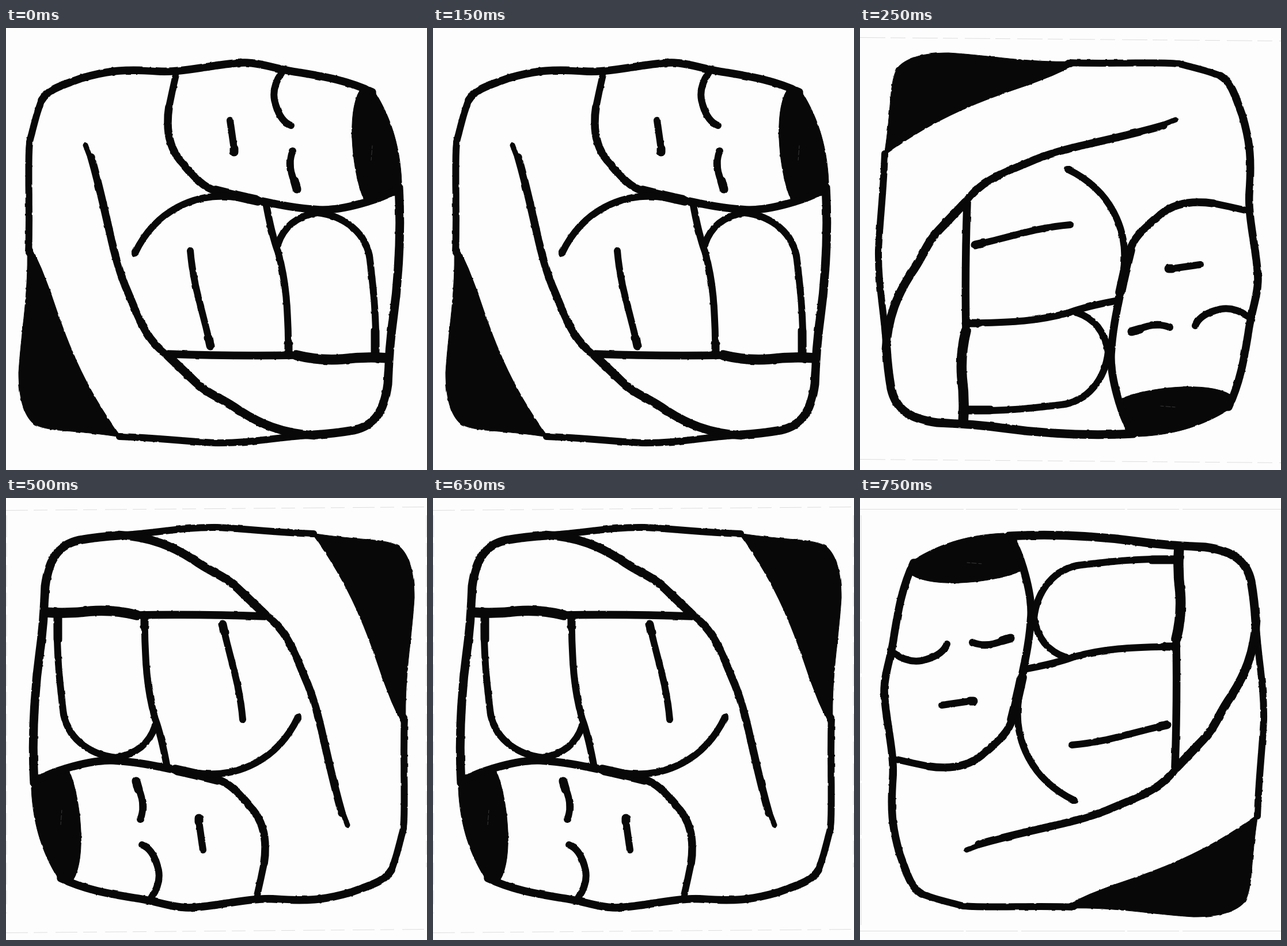
An HTML page that plays this animation: 731 by 766 pixels, repeating every 1000 ms.

```html
<!DOCTYPE html>
<html lang="en">
<head>
<meta charset="utf-8">
<title>Turning portrait</title>
<style>
  html, body { margin: 0; width: 100%; height: 100%; overflow: hidden; background: #fdfdfd; }
  svg { display: block; width: 100%; height: 100%; overflow: hidden; }

  /* Quarter turns, each held for 250 ms */
  .turn { animation: turn 1s step-end infinite; }
  @keyframes turn {
    0% { transform: matrix(0, 1, -1, 0, 748, 18); }
    25% { transform: matrix(-1, 0, 0, -1, 733, 769); }
    50% { transform: matrix(0, -1, 1, 0, -17, 752); }
    75%, 100% { transform: none; }
  }

  .edge { fill: none; stroke: #dcdcdc; opacity: 0; animation: show 1s step-end infinite; }
  @keyframes show {
    0% { opacity: 1; }
    25%, 100% { opacity: 0; }
  }

  .ink { fill: none; stroke: #080808; stroke-width: 12; stroke-linecap: round; stroke-linejoin: round; }
  .thin { stroke-width: 9; }
  .mid { stroke-width: 13.5; }
  .thick { stroke-width: 15; }
  .heavy { stroke-width: 17.5; }
  .solid { fill: #080808; stroke-width: 1; }
  .dry { stroke: #3c3c3c; stroke-width: 1; stroke-dasharray: 5 3 8 4; }
</style>
</head>
<body>
<svg viewBox="0 0 731 766">
  <filter id="rough">
    <feTurbulence type="fractalNoise" baseFrequency=".09" numOctaves="2" seed="4"/>
    <feDisplacementMap in="SourceGraphic" scale="4" xChannelSelector="R" yChannelSelector="G" color-interpolation-filters="sRGB"/>
  </filter>

  <!-- Paper edges -->
  <path class="edge" style="animation-delay:.25s" stroke-dasharray="44 9 26 12" d="M0 16.5L731 22.5M0 747.5L731 753.5"/>
  <path class="edge" style="animation-delay:.5s" stroke-dasharray="38 10 24 14" d="M0 21.5L731 15.5M0 753.5L731 747.5M1 30V720M730 30V640"/>
  <path class="edge" style="animation-delay:.75s" stroke-dasharray="180 4 90 6" d="M0 19.5H731M0 750.5H731M2 30V740"/>

  <g class="turn">
    <g class="ink" filter="url(#rough)">
      <!-- Frame -->
      <path class="mid" d="M94 113C72 160 66 205 60 240C56 275 43 305 43 335C44 380 61 440 58 485C54 540 56 570 70 618C82 650 88 675 108 687"/>
      <path d="M108 687C130 696 150 700 180 708C230 712 300 707 372 710"/>
      <path class="thick" d="M258 67C350 62 420 68 480 76C530 83 560 84 600 86C650 93 672 110 680 145Q686 180 688 215"/>
      <path d="M688 205C690 270 703 320 702 385C700 430 693 490 691 552"/>

      <!-- Head -->
      <path class="solid" d="M90 134L88 112C130 85 180 65 250 62L265 66Q277 90 279 128C240 146 130 160 90 134Z"/>
      <path class="mid" d="M265 74C280 100 300 165 298 205C295 260 283 300 277 335"/>
      <path class="heavy" d="M282 312Q275 345 265 385"/>
      <path class="mid" d="M265 385C258 412 230 430 212 447C190 465 160 472 120 466"/>
      <path d="M120 466Q90 460 60 453"/>
      <path d="M60 270Q90 291 118 280Q145 272 152 254M196 251Q220 261 250 248M143 360L199 352"/>
      <path class="thick" d="M248 248L262 244M192 353H198"/>

      <!-- Hands -->
      <path d="M277 345C265 420 300 490 373 525"/>
      <path d="M303 210C308 160 340 122 385 117L430 112Q490 106 550 107M303 208Q312 262 358 277"/>
      <path d="M285 298Q340 288 370 277C430 260 480 260 550 258M369 429C430 424 470 408 535 394"/>
      <path class="thick" d="M508 108H550M530 258H550M520 397L534 394"/>

      <!-- Cuff and arm -->
      <path class="heavy" d="M555 86Q552 125 557 165Q560 205 550 245"/>
      <path class="mid" d="M550 245Q552 350 548 468"/>
      <path class="thick" d="M689 212C686 270 668 310 645 345C620 380 622 395 590 427L551 468"/>
      <path class="mid" d="M551 468C520 510 480 520 430 542C370 566 310 572 207 601"/>
      <path class="thin" d="M215 600L186 611"/>

      <!-- Dark corner -->
      <path class="solid" d="M692 549C600 617 520 645 440 672Q400 686 360 706V712C450 710 500 722 580 727C625 727 655 718 670 700C684 670 678 640 692 549Z"/>
    </g>
    <path class="ink dry" d="M186 112L212 114"/>
  </g>
</svg>
</body>
</html>
```
